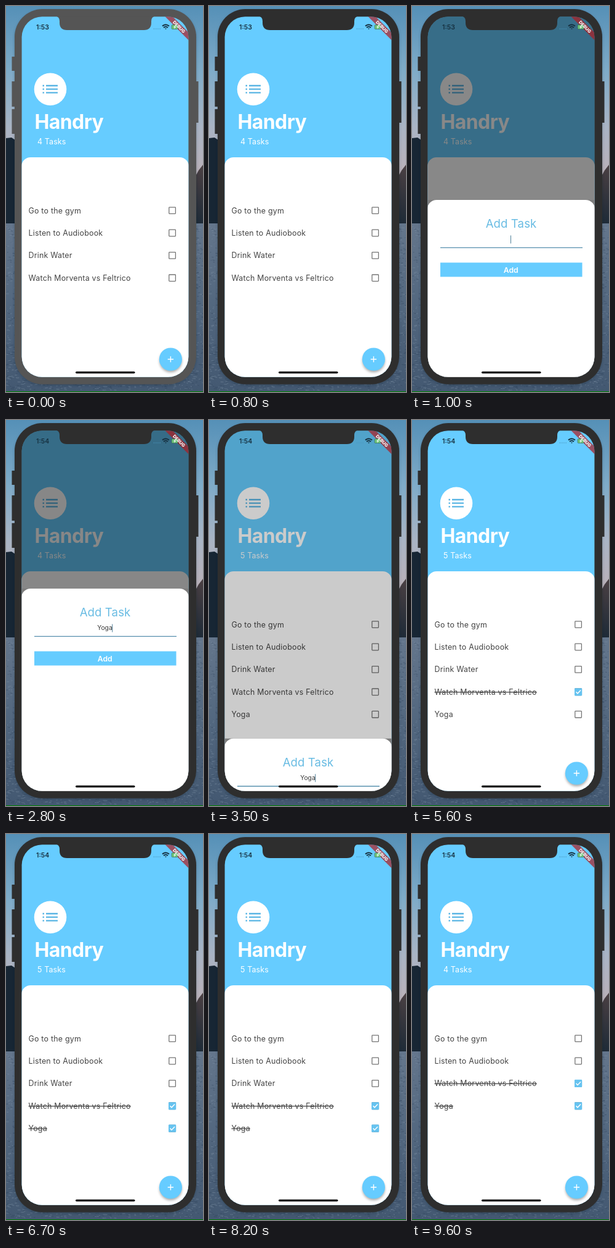
Recreate the animation shown at these times as an HTML page. Size 320 px wide and 625 px high, loop 9700 ms.

```html
<!DOCTYPE html>
<html lang="en">
<head>
<meta charset="utf-8">
<title>Task list</title>
<style>
  html, body { margin: 0; width: 100%; height: 100%; overflow: hidden; background: #4f647c; }
  svg { display: block; width: 320px; height: 625px; font-family: Inter, Roboto, sans-serif; }
  .task text { font-size: 12.4px; letter-spacing: .23px; fill: #444; }
  .done text { text-decoration: line-through; }
</style>
</head>
<body>
<svg viewBox="0 0 320 625" xmlns="http://www.w3.org/2000/svg">
  <defs>
    <linearGradient id="sky" x2="0" y2="1">
      <stop offset="0" stop-color="#5590b7"/>
      <stop offset=".3" stop-color="#7fabc8"/>
      <stop offset=".55" stop-color="#a9b4c4"/>
      <stop offset=".75" stop-color="#b9b1b9"/>
      <stop offset="1" stop-color="#a59da5"/>
    </linearGradient>
    <linearGradient id="water" x2="0" y2="1">
      <stop offset="0" stop-color="#64768c"/>
      <stop offset=".5" stop-color="#52677f"/>
      <stop offset="1" stop-color="#435871"/>
    </linearGradient>
    <linearGradient id="hill" x2="0" y2="1">
      <stop offset="0" stop-color="#4b4043"/>
      <stop offset="1" stop-color="#1d2a37"/>
    </linearGradient>
    <filter id="soft" x="-50%" y="-50%" width="200%" height="200%"><feGaussianBlur stdDeviation="2"/></filter>
    <clipPath id="screen"><rect x="25.600" y="17.300" width="270.800" height="583.500" rx="33"/></clipPath>
  </defs>

  <rect width="320" height="355" fill="url(#sky)"/>
  <path d="M0 214L9 213L18 219V355H0Z" fill="#172634"/>
  <path d="M302 286L313 266L320 257V355H302Z" fill="url(#hill)"/>
  <rect y="352" width="320" height="273" fill="url(#water)"/>
  <g fill="none" stroke-width="1.200" opacity=".4">
    <path id="troughs" stroke="#2c4058"/>
    <path id="crests" stroke="#7f92a6"/>
  </g>
  <rect y="624" width="320" height="1" fill="#008000"/>

  <rect x="14" y="7" width="295" height="607" rx="46" fill="#10202f" opacity=".3" filter="url(#soft)"/>
  <g id="bezel">
    <path d="M9.500 82h6v23h-6zM9.500 122h6v41h-6zM9.500 167h6v40h-6zM306 122h6.500v67h-6.500z"/>
    <rect x="14" y="5" width="295" height="607.500" rx="45"/>
  </g>

  <g clip-path="url(#screen)">
    <rect x="25" y="17" width="272" height="584" fill="#66ccff"/>
    <circle cx="72" cy="134.700" r="26.300" fill="#fff"/>
    <path d="M59.500 129h2.500m3 0h19M59.500 134.700h2.500m3 0h19M59.500 140.400h2.500m3 0h19" stroke="#59b5e4" stroke-width="2.300"/>
    <text x="46.500" y="199" font-size="32" font-weight="700" letter-spacing="-.6" fill="#fff">Handry</text>
    <text id="count" x="51" y="223.700" font-size="12.500" letter-spacing=".1" fill="#fff"></text>
    <path d="M25 620V259.500a15 14.500 0 0 1 15-14.500h242a15 14.500 0 0 1 15 14.500V620z" fill="#fff"/>
    <g id="list"></g>
    <circle cx="267.500" cy="575" r="18" fill="#000" opacity=".35" filter="url(#soft)"/>
    <circle cx="267.400" cy="572" r="18.600" fill="#66ccff"/>
    <path d="M262.700 572h9.400M267.400 567.300v9.400" stroke="#fff" stroke-width="1.400"/>

    <rect id="scrim" x="25" y="17" width="272" height="584"/>
    <g id="sheet">
      <rect x="25" width="272" height="330" fill="#7d7d7d"/>
      <path d="M25 340V14.500a15 14.500 0 0 1 15-14.500h242a15 14.500 0 0 1 15 14.500V340z" fill="#fff"/>
      <g text-anchor="middle">
        <text x="161" y="45" font-size="18.600" letter-spacing=".1" fill="#69bce3">Add Task</text>
        <text id="entry" x="160.500" y="67" font-size="10.300" fill="#3c3c3c"></text>
        <path d="M46 77.300h231" stroke="#5790ae" stroke-width="1.300"/>
        <rect x="46" y="101.500" width="230.500" height="23" fill="#66ccff"/>
        <text x="160.700" y="117.600" font-size="12.200" font-weight="600" fill="#fff">Add</text>
      </g>
      <rect id="caret" y="57.500" width="1" height="13" fill="#4f7f98"/>
    </g>

    <text id="clock" x="49" y="37.800" font-size="10.500" font-weight="600" fill="#16303f"></text>
    <g fill="#4b96bc">
      <circle cx="240.500" cy="37" r=".8"/><circle cx="243.700" cy="37" r=".8"/>
      <circle cx="246.900" cy="37" r=".8"/><circle cx="250.100" cy="37" r=".8"/>
    </g>
    <g fill="none" stroke="#16303f" stroke-width="1.900">
      <path d="M254 32.500q5.500-4.600 11 0M256 35q3.500-2.900 7 0"/>
      <path d="M258 36.300h3l-1.500 1.700z" fill="#16303f" stroke="none"/>
    </g>
    <g transform="translate(297 17.800) rotate(45)">
      <rect x="-40" y="18.200" width="80" height="8.600" fill="#b01c20" opacity=".7"/>
    </g>
    <rect x="269" y="30.500" width="10" height="7" rx="1.500" fill="#6bc278" stroke="#26333a" stroke-opacity=".5" stroke-width=".8"/>
    <path d="M275 31l-3 3.500h2l-1 3 3.200-4h-2z" fill="#fff"/>
    <text transform="translate(297 17.800) rotate(45)" y="25.100" text-anchor="middle" font-size="7.200" font-weight="800" fill="#fff">DEBUG</text>
    <rect x="113" y="591.700" width="96.500" height="3.300" rx="1.650" fill="#050505"/>
  </g>
  <path id="notch" d="M79 16.500q8 0 8 8v2.500q0 12 12 12h125q12 0 12-12v-2.500q0-8 8-8z"/>
</svg>

<script>
const LOOP = 9700, STEP = 100;
const OPEN = 825, CLOSE = 3352, SLIDE = 200;
const ADDED = 3300, REMOVED = 8300, MINUTE = 1900, ACTIVE = 200;
const KEYS = [1700, 2000, 2200, 2500];
const TASKS = [
  { name: 'Go to the gym' },
  { name: 'Listen to Audiobook' },
  { name: 'Drink Water', until: REMOVED },
  { name: 'Watch Morventa vs Feltrico', checked: 5400 },
  { name: 'Yoga', from: ADDED, checked: 6100 }
];

const $ = id => document.getElementById(id);
const set = (el, attrs) => { for (const k in attrs) el.setAttribute(k, attrs[k]); };
const clamp = v => Math.max(0, Math.min(1, v));

// Cubic bezier (.25, .1, .25, 1), solved by bisection.
function ease(x) {
  const at = (s, a, b) => 3 * (1 - s) ** 2 * s * a + 3 * (1 - s) * s * s * b + s ** 3;
  let lo = 0, hi = 1;
  for (let i = 0; i < 20; i++) {
    const mid = (lo + hi) / 2;
    if (at(mid, .25, .25) < x) lo = mid; else hi = mid;
  }
  return at(lo, .1, 1);
}

function drawWaves(id, seed) {
  const rnd = () => (seed = seed * 16807 % 2147483647) / 2147483647;
  let d = '';
  for (let i = 0; i < 1600; i++) {
    const x = rnd() * 320, y = 354 + rnd() * 268;
    d += `M${x.toFixed(1)} ${y.toFixed(1)}l${(1 + rnd() * 4).toFixed(1)} ${(rnd() - .5).toFixed(1)}`;
  }
  $(id).setAttribute('d', d);
}

function buildList() {
  $('list').innerHTML = TASKS.map(task => `<g class="task">
    <text x="36.500" y="4.500">${task.name}</text>
    <rect x="264.800" y="-5.200" width="10.600" height="10.600" rx=".8" fill="none" stroke="#757575" stroke-width="1.300"/>
    <g><rect x="264" y="-6" width="12.200" height="12.200" rx="1.200" fill="#66c3f0"/>
    <path d="M266.500 0l2.500 2.600 5-5.200" fill="none" stroke="#fff" stroke-width="1.500"/></g></g>`).join('');
  TASKS.forEach((task, i) => {
    task.el = $('list').children[i];
    task.tick = task.el.lastElementChild;
  });
}

function drawList(t) {
  let row = 0;
  for (const { el, tick, from = 0, until = LOOP, checked = LOOP } of TASKS) {
    const shown = t >= from && t < until;
    set(el, {
      display: shown ? 'inline' : 'none',
      class: t >= checked ? 'task done' : 'task',
      transform: `translate(0 ${331 + row * 36.4})`
    });
    tick.setAttribute('opacity', t < checked ? 0 : clamp((t - checked + STEP) / 200));
    if (shown) row++;
  }
  $('count').textContent = row + ' Tasks';
}

function drawSheet(t) {
  const p = clamp((t - OPEN) / SLIDE) - clamp((t - CLOSE) / SLIDE);
  set($('sheet'), { transform: `translate(0 ${601 - 328 * p})`, display: p > 0 ? 'inline' : 'none' });
  $('scrim').setAttribute('opacity', .47 * ease(p));

  const typed = KEYS.filter(k => k <= t).length;
  const last = typed ? KEYS[typed - 1] : OPEN;
  const entry = $('entry');
  entry.textContent = 'Yoga'.slice(0, typed);
  const width = typed && p > 0 ? entry.getComputedTextLength() : 0;
  set($('caret'), {
    x: 160 + width / 2,
    opacity: Math.floor((t - last) / 500) % 2 ? 0 : 1
  });
}

function draw(t) {
  const shell = t < ACTIVE ? '#555555' : '#2e2e2e';
  $('bezel').setAttribute('fill', shell);
  $('notch').setAttribute('fill', shell);
  $('clock').textContent = t < MINUTE ? '1:53' : '1:54';
  drawList(t);
  drawSheet(t);
}

drawWaves('troughs', 7);
drawWaves('crests', 91);
buildList();
draw(0);
const start = performance.now();
function tick() {
  const t = (performance.now() - start) % LOOP;
  draw(Math.floor(t / STEP) * STEP);
  requestAnimationFrame(tick);
}
requestAnimationFrame(tick);
</script>
</body>
</html>
```
